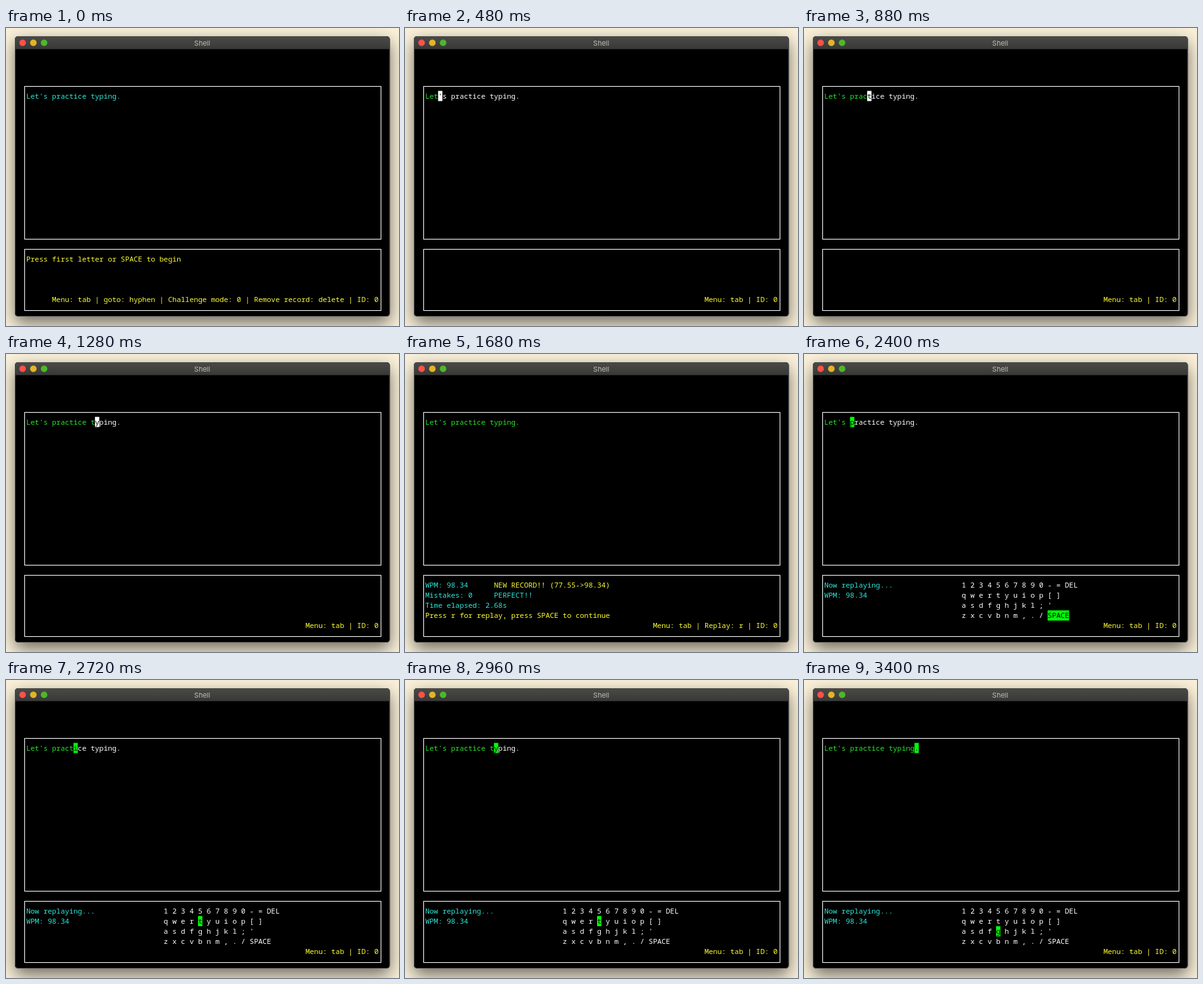
Animation of 622x472 px, one loop 3.44 s. Source, as an HTML page with a canvas:

```html
<!DOCTYPE html>
<html>
<head>
<meta charset="utf-8">
<style>
html, body { margin: 0; width: 100%; height: 100%; overflow: hidden; background: #fbf1da; }
canvas { display: block; }
</style>
</head>
<body>
<canvas id="stage" width="622" height="472"></canvas>
<script>
const ctx = document.getElementById('stage').getContext('2d');
const LOOP = 3440, START = 320, DONE = 1660, REPLAY = 2064;
const CELL = 6.8, ROW = 16.13, LEFT = 32, TOP = 99.6, COLS = 82;
const CYAN = '#2ce8da', GREEN = '#27e52b', YELLOW = '#fdfb35', WHITE = '#fff', KEY = '#00fb08';
const TEXT = "Let's practice typing.";
const KEYS = ['1 2 3 4 5 6 7 8 9 0 - = DEL', 'q w e r t y u i o p [ ]', "a s d f g h j k l ; '", 'z x c v b n m , . / SPACE'];

// Typing rhythm: [characters typed, ms since the first key]
const RHYTHM = [[1, 0], [3, 150], [10, 550], [16, 885], [21, 1300], [22, 1340]];

function typedAt(t) {
  for (let i = 1; i < RHYTHM.length; i++) {
    const [n0, t0] = RHYTHM[i - 1], [n1, t1] = RHYTHM[i];
    if (t < t1) return Math.floor(n0 + (n1 - n0) * (t - t0) / (t1 - t0) + 1e-6);
  }
  return TEXT.length;
}

function print(text, row, col, color, back) {
  const x = LEFT + col * CELL, y = TOP + row * ROW;
  if (back) {
    ctx.fillStyle = back;
    ctx.fillRect(x, y, text.length * CELL, ROW);
  }
  ctx.fillStyle = color;
  ctx.font = '11.5px "Noto Sans Mono", monospace';
  ctx.textAlign = 'left';
  [...text].forEach((c, i) => ctx.fillText(c, x + i * CELL, y + 12));
}

const menu = text => print(text, 20, COLS - text.length, YELLOW);

function typing(n, cursor) {
  print(TEXT.slice(0, n), 0, 0, GREEN);
  print(TEXT.slice(n + 1), 0, n + 1, WHITE);
  if (n < TEXT.length) print(TEXT[n], 0, n, '#000', cursor);
}

function keyboard(char) {
  const key = char === ' ' ? 'SPACE' : char.toLowerCase();
  KEYS.forEach((line, i) => {
    let col = 32;
    for (const k of line.split(' ')) {
      const hit = k === key;
      print(k, 16 + i, col, hit ? '#000' : WHITE, hit && KEY);
      col += k.length + 1;
    }
  });
}

function gradient(y0, y1, a, b) {
  const g = ctx.createLinearGradient(0, y0, 0, y1);
  g.addColorStop(0, a);
  g.addColorStop(1, b);
  return g;
}

function roundBox(x, y, w, h, r) {
  ctx.beginPath();
  ctx.roundRect(x, y, w, h, r);
}

function drawWindow() {
  ctx.fillStyle = '#fbf1da';
  ctx.fillRect(0, 0, 622, 472);
  ctx.save();
  ctx.shadowColor = 'rgba(0,0,0,.56)';
  ctx.shadowBlur = 27;
  ctx.shadowOffsetY = 10;
  ctx.fillStyle = '#000';
  roundBox(14, 13, 593.5, 444, 5);
  ctx.fill();
  ctx.restore();

  ctx.fillStyle = gradient(13, 34, '#4a4a48', '#383836');
  roundBox(14, 13, 593.5, 20.5, [5, 5, 0, 0]);
  ctx.fill();
  ctx.strokeStyle = '#4c4b48';
  ctx.lineWidth = 1;
  roundBox(14.5, 13.5, 592.5, 443, 5);
  ctx.stroke();

  ['#fc5149', '#e4b427', '#4cb82b'].forEach((color, i) => {
    ctx.fillStyle = color;
    ctx.beginPath();
    ctx.arc(26.3 + i * 17, 23.4, 5.2, 0, 7);
    ctx.fill();
  });
  ctx.fillStyle = '#bdbdb9';
  ctx.font = '11px Inter, sans-serif';
  ctx.textAlign = 'center';
  ctx.fillText('Shell', 310.5, 27.5);

  ctx.strokeStyle = WHITE;
  ctx.lineWidth = 1.1;
  ctx.strokeRect(29.5, 92.5, 564, 242);
  ctx.strokeRect(29.5, 350.5, 564, 97);
}

function draw(t) {
  drawWindow();
  if (t < START) {
    print(TEXT, 0, 0, CYAN);
    print('Press first letter or SPACE to begin', 16, 0, YELLOW);
    menu('Menu: tab | goto: hyphen | Challenge mode: 0 | Remove record: delete | ID: 0');
  } else if (t < DONE) {
    typing(typedAt(t - START), WHITE);
    menu('Menu: tab | ID: 0');
  } else if (t < REPLAY) {
    print(TEXT, 0, 0, GREEN);
    print('WPM: 98.34', 16, 0, CYAN);
    print('NEW RECORD!! (77.55->98.34)', 16, 16, YELLOW);
    print('Mistakes: 0     PERFECT!!', 17, 0, CYAN);
    print('Time elapsed: 2.68s', 18, 0, CYAN);
    print('Press r for replay, press SPACE to continue', 19, 0, YELLOW);
    menu('Menu: tab | Replay: r | ID: 0');
  } else {
    const n = typedAt(t - REPLAY);
    typing(n, KEY);
    print('Now replaying...', 16, 0, CYAN);
    print('WPM: 98.34', 17, 0, CYAN);
    keyboard(TEXT[n - 1]);
    menu('Menu: tab | ID: 0');
  }
}

const begin = performance.now();
function frame() {
  draw((performance.now() - begin) % LOOP);
  requestAnimationFrame(frame);
}
frame();
</script>
</body>
</html>
```
